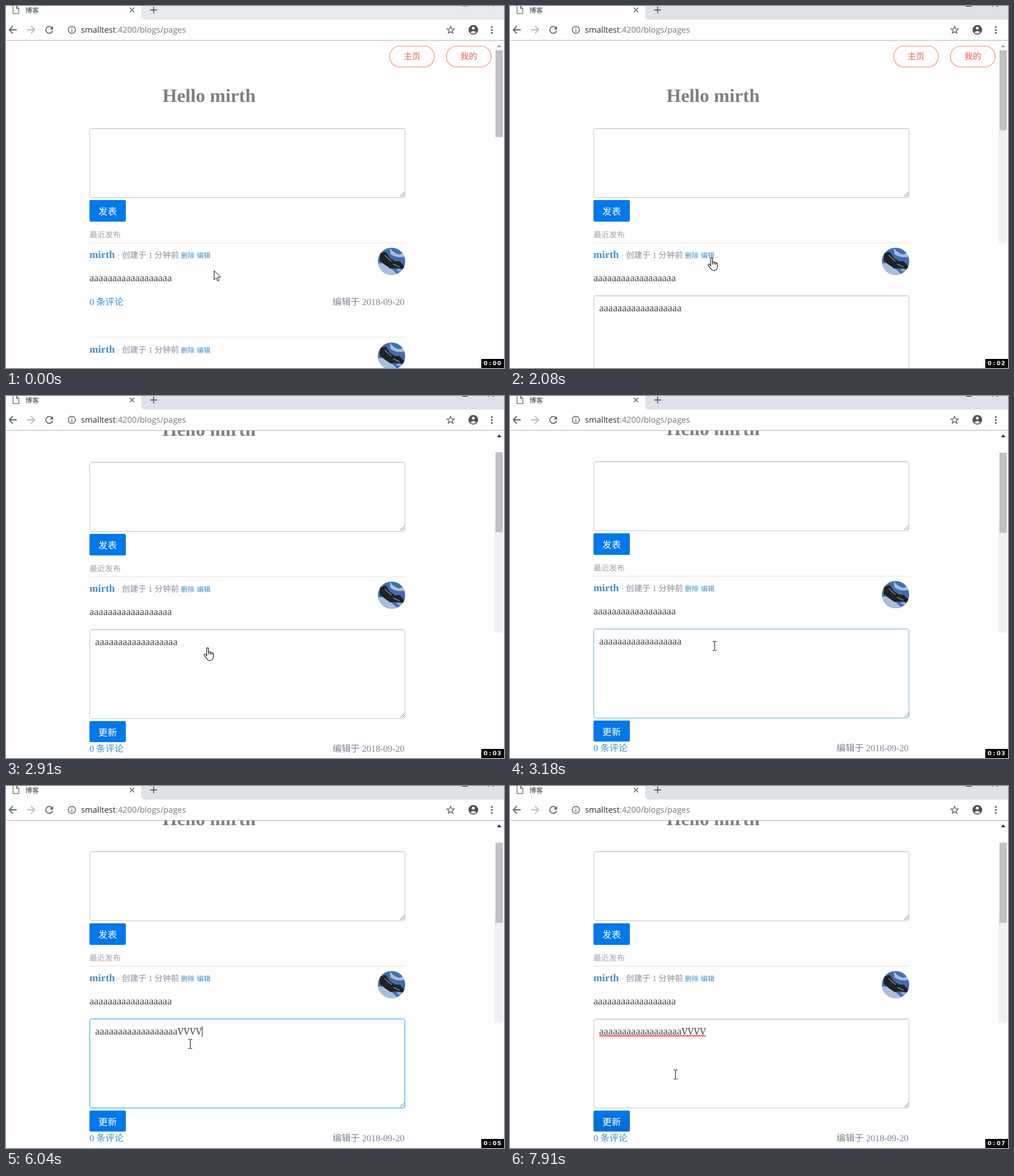
Recreate the animation shown at these times as an HTML page. Size 877x638 px, loop 8000 ms.

```html
<!DOCTYPE html>
<html lang="zh-CN">
<head>
<meta charset="utf-8">
<title>博客</title>
<style>
html, body { margin: 0; width: 100%; height: 100%; overflow: hidden; background: #fefefe; }
svg { display: block; width: 877px; height: 638px; }
text { font-family: "Liberation Serif", "Noto Sans CJK SC", "Noto Sans CJK", serif; white-space: pre; text-rendering: geometricPrecision; }
.ui { font-family: "Open Sans", "Noto Sans CJK SC", "Noto Sans CJK", sans-serif; }
.cap { font-family: "Noto Serif", serif; font-size: 16px; }
.clock { font: bold 10px "DejaVu Sans", sans-serif; fill: #fff; }
.name { font-size: 18.3px; font-weight: bold; fill: #428dc5; }
.meta { font-size: 14.4px; fill: #8a8e9c; }
.link { font-size: 12px; fill: #3d8fca; }
.body { font-size: 18.15px; fill: #444; }
.foot { font-size: 16px; }
.btn { font-size: 16.4px; fill: #fff; }
.pill { fill: none; stroke: #f0836f; stroke-width: 1.1; }
.pillText { font-size: 15px; fill: #e8634d; }
.box { fill: #fefefe; stroke: #c6c6c6; }
.rule { stroke: #e6e6e6; }
.icon { fill: none; stroke: #5f6368; stroke-width: 1.8; }
</style>
</head>
<body>
<svg viewBox="0 0 877 638">
  <defs>
    <clipPath id="view"><rect y="61" width="877" height="577"/></clipPath>
    <clipPath id="round"><circle r="24"/></clipPath>
    <linearGradient id="sky" x2=".4" y2="1">
      <stop stop-color="#3f6fae"/><stop offset="1" stop-color="#416bb0"/>
    </linearGradient>
    <linearGradient id="shade" x2="0" y2="1">
      <stop stop-opacity="0"/><stop offset=".4" stop-opacity=".05"/><stop offset="1" stop-opacity=".1"/>
    </linearGradient>
    <g id="avatar" clip-path="url(#round)">
      <rect x="-24" y="-24" width="48" height="48" fill="url(#sky)"/>
      <path d="M-24 4Q-12 1-4 9T12 24H-10L-24 14ZM-3-24Q3-14 14-12L24-16V-8Q8-5-2-13Z" fill="#a9bedb"/>
      <path d="M8 16Q15 9 24 14L20 20Z" fill="#89a8d2"/>
      <path d="M-20-14L-10-17-3-6 6 0 14 0 24 10V15L10 12-2 13-12 6-21-1Z" fill="#202226"/>
      <path d="M-12-11L-6-5 0 0M3 5L14 10" stroke="#89857a" stroke-width="1.6" fill="none"/>
    </g>
    <path id="grip" d="M-9-1L-1-9M-5-1L-1-5" stroke="#777" fill="none"/>
    <g id="head">
      <text class="name" x="147" y="444">mirth</text>
      <text class="meta" x="196" y="444">·</text>
      <text class="meta" x="204" y="444">创建于 1 分钟前</text>
      <text class="link" x="308" y="444">删除</text>
      <text class="link" x="336" y="444">编辑</text>
      <use href="#avatar" x="679" y="450"/>
    </g>
  </defs>

  <rect width="877" height="638" fill="#fefefe"/>

  <g clip-path="url(#view)">
    <g id="page">
      <rect class="pill" x="675.5" y="70.5" width="79" height="37" rx="18.5"/>
      <text class="pillText" x="700" y="94">主页</text>
      <rect class="pill" x="775.5" y="70.5" width="79" height="37" rx="18.5"/>
      <text class="pillText" x="800" y="94">我的</text>
      <text x="275.5" y="169" font-size="33" font-weight="bold" fill="#7f7f7f">Hello mirth</text>
      <rect class="box" x="147.5" y="215.5" width="555" height="122" rx="3.5"/>
      <path d="M149 216.5H701" stroke="#e2e2e2"/>
      <use href="#grip" x="703" y="337"/>
      <rect x="147" y="342" width="64" height="38" rx="2" fill="#0078e7"/>
      <text class="btn" x="162.5" y="367.5">发表</text>
      <text x="147" y="408" font-size="13.8" fill="#a2a2a2">最近发布</text>
      <path class="rule" d="M147 417.5H703"/>
      <use href="#head"/>
      <text class="body" x="147" y="485">aaaaaaaaaaaaaaaaaa</text>
      <g id="editor">
        <rect id="field" class="box" x="147.5" y="510.5" width="555" height="157" rx="3.5"/>
        <path id="inset" d="M149 511.5H701" stroke="#e2e2e2"/>
        <use href="#grip" x="703" y="667"/>
        <text class="body" x="157" y="538">aaaaaaaaaaaaaaaaaa<tspan id="typed" class="cap"></tspan></text>
        <path id="wave" fill="none" stroke="#f02020" stroke-width="1.1"/>
        <rect id="caret" y="523" width="1" height="19" fill="#222"/>
        <rect x="147" y="672" width="64" height="37" rx="2" fill="#0078e7"/>
        <rect id="hover" x="147" y="672" width="64" height="37" rx="2" fill="url(#shade)"/>
        <text class="btn" x="162.5" y="697.5">更新</text>
      </g>
      <g id="rest">
        <text class="foot" x="147" y="527" fill="#3d8fca">0 条评论</text>
        <text class="foot" x="575" y="527" fill="#7f8496">编辑于 2018-09-20</text>
        <path class="rule" d="M147 583.5H703"/>
        <use href="#head" y="167"/>
      </g>
    </g>
    <rect id="track" x="860" y="219" width="15" height="198" fill="#f1f1f1"/>
    <rect id="thumb" x="862" width="13" fill="#c2c2c2"/>
    <path id="up" d="M864.5 72.5L868.5 68L872.5 72.5Z"/>
  </g>

  <path id="strip" d="M238 0H877V24H246Q238 24 238 16Z"/>
  <path d="M0 60.5H877" stroke="#b4b4b4"/>
  <path d="M12.5 0V13.5H22.5V4.5L18.5 0V4.5H22.5" fill="none" stroke="#5f6368" stroke-width="1.2"/>
  <text class="ui" x="34" y="12" font-size="12" fill="#3c4043">博客</text>
  <path class="icon" style="stroke-width:1.5" d="M218 3L226 11M226 3L218 11"/>
  <path class="icon" d="M254 7H266M260 1V13"/>
  <path id="winBtns" d="M803 .5H813M849 0.5H850.5M857 .5H858.5"/>
  <path class="icon" d="M19 42H6M12 35.5L5.7 42L12 48.5"/>
  <path class="icon" style="stroke:#babcbe" d="M37 42H50M44 35.5L50.3 42L44 48.5"/>
  <path class="icon" d="M81 38.6A6 6 0 1 0 82 43.5"/>
  <path d="M82.8 35.5V41.5H76.8Z" fill="#5f6368"/>
  <circle class="icon" style="stroke-width:1.5" cx="116" cy="42" r="6.3"/>
  <path class="icon" style="stroke-width:1.5" d="M116 38.2V39.8M116 41.2V45.8"/>
  <text class="ui" x="132" y="47" font-size="14.5" fill="#2b2d30">smalltest<tspan fill="#75797d">:4200/blogs/pages</tspan></text>
  <path id="star" class="icon" style="stroke-width:1.4"/>
  <circle cx="823" cy="42" r="8.5" fill="#4d5156"/>
  <circle cx="823" cy="39" r="2.6" fill="#fff"/>
  <path d="M817.8 46.5Q823 41.8 828.2 46.5Q823 51 817.8 46.5Z" fill="#fff"/>
  <g fill="#5f6368"><circle cx="855.5" cy="37" r="1.7"/><circle cx="855.5" cy="42.2" r="1.7"/><circle cx="855.5" cy="47.4" r="1.7"/></g>

  <path id="arrow" d="M.5 .5V16.5L4.2 13L6.8 18.7L9.2 17.7L6.7 12H11.8Z" fill="#fff" stroke="#111"/>
  <path id="hand" fill="#fff" stroke="#111" stroke-width="1.1" stroke-linejoin="round"
    d="M5.5 15V2Q5.6 .6 7 .6T8.6 2V9Q9 7.6 10.3 7.8T11.7 9.3Q12.3 8.2 13.3 8.6T14.5 10.3Q15.4 9.4 16.4 10T17.4 12V16Q17.4 19 15.5 21Q13.8 23.4 11 23.4T6.8 21.3L1.2 14.6Q.2 13 1.4 12.1T4 12.8ZM8.6 9V12.5M11.7 9.3V12.7M14.5 10.3V13"/>
  <path id="beam" fill="none" stroke="#111" d="M-3.5-8H-.5M.5-8H3.5M0-7.5V7.5M-3.5 8H-.5M.5 8H3.5"/>

  <rect x="837" y="622" width="40" height="16"/>
  <text id="clock" class="clock" x="841 850.5 857 865" y="633"></text>
</svg>
<script>
const $ = id => document.getElementById(id);
const set = (id, attrs) => { for (const k in attrs) $(id).setAttribute(k, attrs[k]); };
const show = (id, on) => set(id, { visibility: on ? 'inherit' : 'hidden' });
const LOOP = 8000;

const ticks = [870, 1960, 2910, 3920, 4980, 6140, 7170];
const scroll = [[0, 0], [2790, 13], [2910, 99], [3030, 100]];
const focus = [[0, 0], [3180, .5], [3310, 1], [7280, .5], [7390, 0]];
const typing = [[0, 0], [5080, 1], [5640, 4]];
const caret = [[0, 0], [3310, 1], [3920, 0], [4550, 1], [4980, 0], [5080, 1], [6290, 0], [6770, 1], [7170, 0]];
const spell = [[0, 0], [3310, 1], [5080, 0], [7280, 1]];
const pointer = [
  [0, 'arrow', 366, 466], [1390, 'arrow', 363, 461], [1540, 'arrow', 359, 449], [1690, 'hand', 348, 443],
  [3180, 'beam', 360.5, 440.5], [3460, 'beam', 355.5, 438.5], [6040, 'beam', 324.5, 454.5],
  [6290, 'beam', 304.5, 478.5], [6410, 'beam', 266.5, 520.5], [6530, 'beam', 226.5, 559.5],
  [6650, 'hand', 190, 586], [6770, 'hand', 179, 592],
  [7640, 'beam', 240.5, 548.5], [7760, 'beam', 283.5, 513.5], [7910, 'beam', 291.5, 508.5]
];

// Last entry already reached at time t.
const entry = (list, t) => list.filter(e => e[0] <= t).pop();
const value = (list, t) => entry(list, t)[1];
const mix = (a, b, k) => `rgb(${a.map((v, i) => Math.round(v + (b[i] - v) * k))})`;

function wavePath(end) {
  let d = 'M157 539.3';
  for (let x = 159, i = 0; x <= end; x += 2, i++) d += `L${x} ${i % 2 ? 539.3 : 541.3}`;
  return d;
}

function starPath(cx, cy) {
  const pts = Array.from({ length: 10 }, (_, i) => {
    const r = i % 2 ? 2.9 : 6.8, a = Math.PI * (i / 5 - .5);
    return `${cx + r * Math.cos(a)} ${cy + r * Math.sin(a)}`;
  });
  return `M${pts.join('L')}Z`;
}

function draw(t) {
  const y = value(scroll, t), n = value(typing, t), f = value(focus, t);
  const active = t >= 1840, open = t >= 1960, tall = t >= 2080;

  set('strip', { fill: active ? '#dee1e6' : '#e7eaed' });
  set('winBtns', { stroke: active ? '#111' : '#8b8d90' });

  set('page', { transform: `translate(0 ${-y})` });
  show('editor', open);
  set('rest', { transform: `translate(0 ${open ? 199 : 0})` });
  set('thumb', { y: 78 + Math.round(y * .22 - .4), height: tall ? 141 : 153 });
  show('track', tall);
  set('up', { fill: y ? '#222' : '#a3a3a3' });

  set('field', { style: `stroke:${mix([198, 198, 198], [18, 159, 234], f)}` });
  set('inset', { opacity: 1 - f });
  $('typed').textContent = 'V'.repeat(n);
  show('wave', open && value(spell, t));
  set('wave', { d: wavePath(n ? 345 : 302) });
  show('caret', open && value(caret, t));
  set('caret', { x: 302 + Math.round(n * 10.7) });
  show('hover', open && t >= 6650);

  const [, kind, px, py] = entry(pointer, t);
  for (const id of ['arrow', 'hand', 'beam']) show(id, id === kind);
  set(kind, { transform: `translate(${px} ${py})` });

  $('clock').textContent = '0:0' + ticks.filter(s => s <= t).length;
}

set('star', { d: starPath(783, 42.5) });
const start = performance.now();
function loop() {
  draw((performance.now() - start) % LOOP);
  requestAnimationFrame(loop);
}
loop();
</script>
</body>
</html>
```
